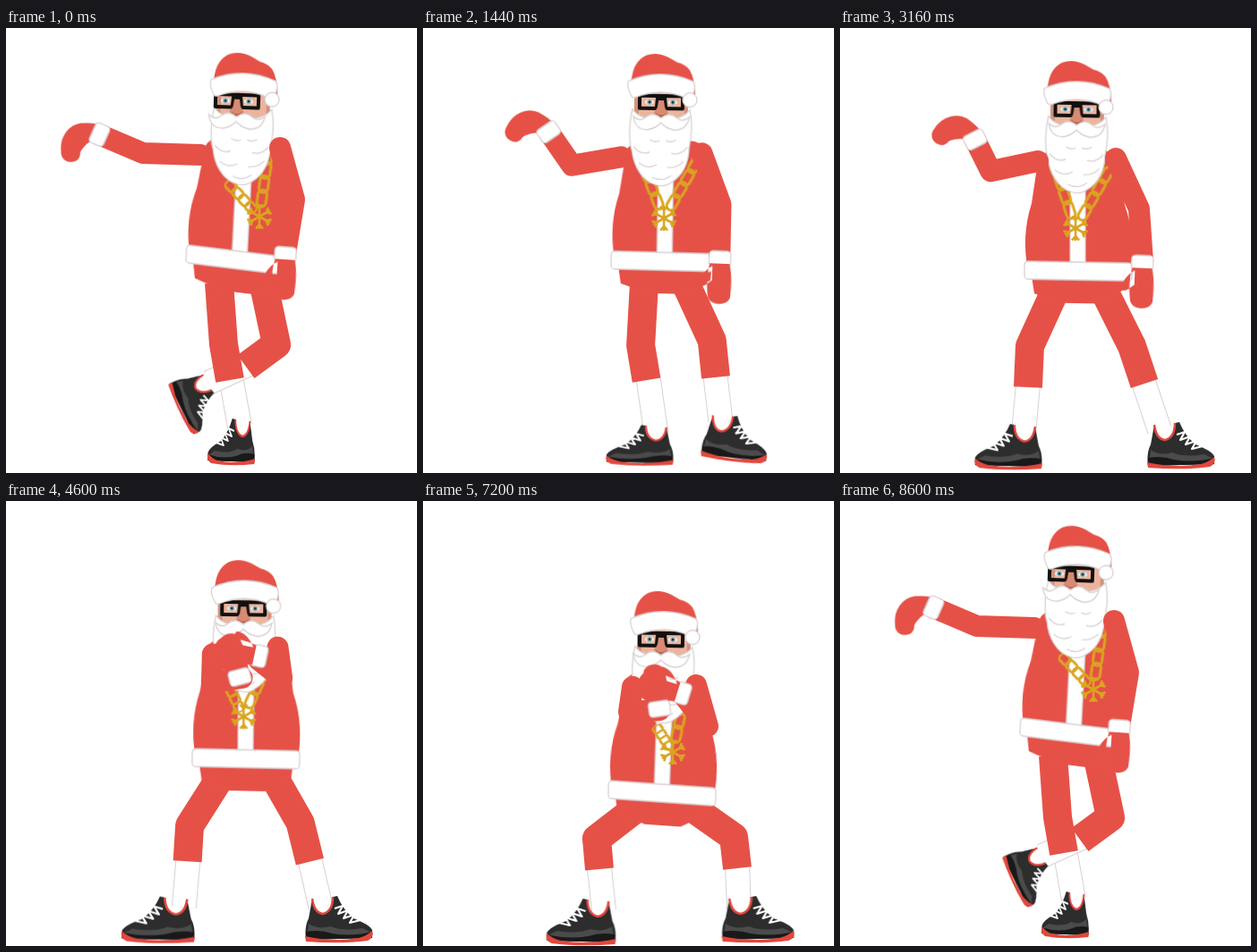
An HTML page without scripts that plays this animation: 459x498 px, repeating every 8640 ms.

```html
<!DOCTYPE html>
<html lang="en">
<head>
<meta charset="utf-8">
<title>Dancing Santa</title>
<style>
html,body{margin:0;width:100%;height:100%;overflow:hidden;background:#fff}
svg{display:block;width:459px;height:498px}
.red{fill:#e65147}
.white{fill:#fff;stroke:#d9d0d2;stroke-width:1.3}
.limb{fill:none;stroke:#e65147;stroke-linejoin:round}
.arm{stroke-width:24;stroke-linecap:round}
.pants{stroke-width:32}
.edge{fill:none;stroke:#d9d0d2;stroke-width:28}
.sock{fill:none;stroke:#fff;stroke-width:26}
.gold{fill:none;stroke:#d9a51f;stroke-width:3}
.fold{fill:none;stroke:#ddd3d5;stroke-width:1.4}

/* every moving part shares one clock */
.a{animation:8.64s ease-in-out infinite}
.head{animation-name:head}
.look{animation-name:look}
.torso{animation-name:torso}
.charm{animation-name:charm}
.chain-l{animation-name:chain-l}
.chain-r{animation-name:chain-r}
.arm-l{animation-name:arm-l}
.arm-r{animation-name:arm-r}
.hand-l{animation-name:hand-l}
.hand-r{animation-name:hand-r}
.mitt{animation-name:mitt}
.cuff{animation-name:cuff}
.pants-l{animation-name:pants-l}
.pants-r{animation-name:pants-r}
.sock-l{animation-name:sock-l}
.sock-r{animation-name:sock-r}
.shoe-l{animation-name:shoe-l}
.shoe-r{animation-name:shoe-r}

@keyframes head{
0%,99.5%,100%{transform:translate(265px,82px) rotate(2deg)}
5.1%{transform:translate(267px,78px) rotate(1deg)}
10.2%{transform:translate(268px,80px) rotate(0deg)}
15.3%{transform:translate(266px,82px) rotate(1deg)}
20.4%{transform:translate(266px,89px) rotate(0deg)}
26.4%{transform:translate(265px,96px) rotate(0deg)}
36%{transform:translate(265px,91px) rotate(1deg)}
47.7%{transform:translate(264px,109px) rotate(0deg)}
57%{transform:translate(268px,126px) rotate(1deg)}
66.2%{transform:translate(272px,139px) rotate(2deg)}
75%{transform:translate(270px,139px) rotate(0deg)}
83.3%{transform:translate(269px,155px) rotate(1deg)}
90%{transform:translate(269px,138px) rotate(1deg)}
}
@keyframes look{
0%,99.5%,100%{transform:translate(-7px,0)}
10.2%,26.4%{transform:translate(0,0)}
47.7%{transform:translate(-1px,0)}
66.2%,83.3%{transform:translate(-3px,0)}
}
@keyframes torso{
0%,99.5%,100%{transform:translate(261px,260px) rotate(3deg) skewY(4deg)}
10.2%{transform:translate(275px,256px) rotate(0deg) skewY(-1deg)}
15.3%{transform:translate(270px,260px) rotate(1deg) skewY(1deg)}
20.4%{transform:translate(271px,268px) rotate(0deg) skewY(-1deg)}
26.4%{transform:translate(265px,278px) rotate(0deg) skewY(0deg)}
36%{transform:translate(266px,272px) rotate(0deg) skewY(1deg)}
47.7%{transform:translate(266px,283px) rotate(1deg) skewY(1deg)}
66.2%{transform:translate(276px,312px) rotate(-1deg) skewY(-1deg)}
75%{transform:translate(271px,312px) rotate(0deg) skewY(0deg)}
83.3%{transform:translate(267px,327px) rotate(2deg) skewY(2deg)}
90%{transform:translate(267px,312px) rotate(1deg) skewY(2deg)}
}
@keyframes charm{
0%,99.5%,100%{transform:translate(283px,211px)}
10.2%{transform:translate(264px,207px)}
15.3%{transform:translate(270px,212px)}
20.4%{transform:translate(264px,218px)}
26.4%{transform:translate(259px,229px)}
36%{transform:translate(263px,224px)}
47.7%{transform:translate(264px,236px)}
66.2%{transform:translate(271px,264px)}
75%{transform:translate(272px,264px)}
83.3%{transform:translate(279px,281px)}
90%{transform:translate(276px,265px)}
}
@keyframes chain-l{
0%,99.5%,100%{transform:rotate(-43deg) scale(1,.68)}
10.2%{transform:rotate(-23deg) scale(1,1)}
26.4%,36%{transform:rotate(-18deg) scale(1,1.05)}
47.7%{transform:rotate(-24deg) scale(1,.6)}
66.2%{transform:rotate(-34deg) scale(1,.55)}
83.3%{transform:rotate(-33deg) scale(1,.45)}
}
@keyframes chain-r{
0%,99.5%,100%{transform:rotate(8deg)}
10.2%,26.4%,36%{transform:rotate(30deg)}
47.7%{transform:rotate(25deg)}
66.2%{transform:rotate(23deg)}
83.3%{transform:rotate(12deg)}
}
@keyframes arm-l{
0%,99.5%,100%{d:path("M217 142L153 140L106 120")}
10.2%{d:path("M222 140L167 148L140 110")}
20.4%{d:path("M221 146L166 156L140 118")}
26.4%{d:path("M222 153L167 163L146 126")}
36%{d:path("M221 149L168 160L150 124")}
47.7%{d:path("M231 168L229 206L264 198")}
66.2%{d:path("M230 186L234 190L262 197")}
83.3%{d:path("M234 208L230 236L264 234")}
90%{d:path("M234 194L228 222L262 218")}
95.4%{d:path("M220 165L178 180L155 150")}
}
@keyframes hand-l{
0%,99.5%,100%{transform:translate(104px,119px) rotate(-66deg)}
10.2%{transform:translate(140px,110px) rotate(-38deg)}
20.4%{transform:translate(140px,118px) rotate(-33deg)}
26.4%{transform:translate(146px,126px) rotate(-27deg)}
36%{transform:translate(150px,124px) rotate(-27deg)}
47.7%{transform:translate(264px,198px) rotate(-12deg)}
66.2%{transform:translate(247px,190px) rotate(-26deg)}
83.3%{transform:translate(264px,232px) rotate(-8deg)}
90%{transform:translate(262px,218px) rotate(-12deg)}
95.4%{transform:translate(155px,150px) rotate(-38deg)}
}
@keyframes mitt{
0%,36%,96%,100%{d:path("M-9 -4C-15 -9 -22 -11 -27 -11C-32 -9 -36 -9 -39 -13C-45 -20 -42 -28 -35 -31C-24 -38 -6 -38 3 -24C8 -14 11 -6 10 2ZM-6 -12C-6 -12 -6 -12 -6 -12C-6 -12 -6 -12 -6 -12Z")}
47.7%,90%{d:path("M-11 4C-13 -8 -13 -16 -13 -24C-13 -30 -13 -36 -12 -42C-10 -52 9 -52 11 -42C13 -30 13 -20 12 -10C12 -4 11 0 11 4ZM-8 -6C-18 -12 -24 -22 -24 -29C-20 -35 -14 -28 -8 -24Z")}
}
@keyframes cuff{
0%,57%,75%,100%{transform:scale(1)}
66.2%{transform:scale(0)}
}
@keyframes arm-r{
0%,99.5%,100%{d:path("M306 134L322 192L312 252")}
10.2%{d:path("M313 136L331 193L327 250")}
20.4%{d:path("M311 142L333 199L333 256")}
26.4%{d:path("M309 150L334 207L338 264")}
36%{d:path("M308 146L334 202L338 258")}
47.7%{d:path("M304 160L310 202L284 176")}
66.2%{d:path("M301 180L300 183L277 187")}
83.3%{d:path("M305 206L318 252L289 215")}
90%{d:path("M305 192L320 236L292 202")}
95.4%{d:path("M306 160L362 163L410 150")}
}
@keyframes hand-r{
0%,99.5%,100%{transform:translate(312px,254px) rotate(184deg)}
10.2%{transform:translate(328px,255px) rotate(183deg)}
20.4%{transform:translate(333px,260px) rotate(182deg)}
26.4%{transform:translate(338px,270px) rotate(180deg)}
36%{transform:translate(338px,264px) rotate(182deg)}
47.7%{transform:translate(284px,173px) rotate(262deg)}
66.2%{transform:translate(275px,175px) rotate(369deg)}
83.3%{transform:translate(289px,215px) rotate(287deg)}
90%{transform:translate(292px,202px) rotate(270deg)}
95.4%{transform:translate(410px,150px) rotate(100deg)}
}
@keyframes pants-l{
0%,99.5%,100%{d:path("M238 285L243 354L250 394")}
10.2%{d:path("M249 283L246 353L251 392")}
20.4%{d:path("M246 290L242 356L249 395")}
26.4%{d:path("M241 293L219 362L220 403")}
36%{d:path("M242 290L212 356L210 402")}
47.7%{d:path("M243 297L206 362L203 402")}
66.2%{d:path("M245 329L201 369L201 409")}
75%{d:path("M241 329L198 372L199 410")}
83.3%{d:path("M238 344L194 378L197 412")}
90%{d:path("M238 330L200 372L200 410")}
}
@keyframes sock-l{
0%,99.5%,100%{d:path("M251 390L261 446")}
10.2%{d:path("M255 388L262 456")}
20.4%{d:path("M250 392L260 454")}
26.4%{d:path("M220 401L221 456")}
36%{d:path("M210 400L205 454")}
47.7%{d:path("M204 400L198 454")}
66.2%{d:path("M201 407L202 458")}
83.3%,90%{d:path("M197 411L202 458")}
}
@keyframes shoe-l{
0%,99.5%,100%{transform:translate(264px,442px) scale(.7,1)}
10.2%{transform:translate(262px,450px) scale(1,.8)}
20.4%{transform:translate(259px,448px) scale(1,.9)}
26.4%{transform:translate(221px,448px) scale(.87,.97)}
36%{transform:translate(206px,448px) scale(1,.98)}
47.7%{transform:translate(188px,447px) scale(1.1,1)}
66.2%,83.3%,90%{transform:translate(195px,450px) scale(1.03,1)}
}
@keyframes pants-r{
0%,99.5%,100%{d:path("M288 288L302 354L268 379")}
5.1%{d:path("M291 286L322 348L334 392")}
10.2%{d:path("M298 283L307 342L280 367")}
15.3%{d:path("M294 288L325 350L335 394")}
20.4%{d:path("M297 290L310 348L282 373")}
26.4%{d:path("M292 293L320 362L325 403")}
36%{d:path("M293 290L326 356L340 398")}
47.7%{d:path("M293 297L323 358L336 403")}
66.2%{d:path("M309 328L353 369L354 406")}
75%{d:path("M304 330L351 370L353 408")}
83.3%{d:path("M303 345L347 376L351 411")}
90%{d:path("M302 330L346 370L350 408")}
}
@keyframes sock-r{
0%,99.5%,100%{d:path("M272 376L226 397")}
5.1%{d:path("M333 390L348 442")}
10.2%{d:path("M282 365L254 398")}
15.3%{d:path("M334 392L346 446")}
20.4%{d:path("M284 371L256 404")}
26.4%{d:path("M325 401L329 457")}
36%{d:path("M339 396L357 450")}
47.7%{d:path("M336 401L351 454")}
66.2%{d:path("M354 404L354 456")}
83.3%,90%{d:path("M351 409L353 456")}
}
@keyframes shoe-r{
0%,99.5%,100%{transform:translate(223px,398px) rotate(66deg) scale(.84,.84)}
5.1%{transform:translate(352px,438px) rotate(4deg) scale(1,1)}
10.2%{transform:translate(255px,397px) rotate(42deg) scale(.84,.84)}
15.3%{transform:translate(349px,443px) rotate(2deg) scale(1,1)}
20.4%{transform:translate(257px,403px) rotate(40deg) scale(.84,.84)}
26.4%{transform:translate(328px,448px) rotate(0deg) scale(.86,1)}
36%{transform:translate(363px,446px) rotate(0deg) scale(1,1)}
47.7%,66.2%{transform:translate(354px,447px) rotate(0deg) scale(1,1)}
83.3%,90%{transform:translate(355px,447px) rotate(0deg) scale(1.07,1)}
}
</style>
</head>
<body>
<svg viewBox="0 0 459 498" role="img" aria-label="Santa dancing">
<defs>
  <g id="shoe">
    <path d="M-12 -2Q-10 14 0 15Q11 12 11 -4L16 -5Q22 10 34 20Q52 27 55 33L55 42L-19 44Q-21 30 -16 20Z" fill="#2d2d2d"/>
    <path d="M-16 26Q-6 33 8 29Q22 35 44 31L54 36L40 41L-18 41Z" fill="#4b4b4b"/>
    <path d="M-19 35Q-4 32 10 37Q32 41 55 35V42L-19 44Z" fill="#191919"/>
    <path d="M-20 40Q10 47 40 42Q50 39 55 34Q58 41 50 45Q20 49 -19 46Z" fill="#e2473d"/>
    <path d="M-12 -2Q-10 14 0 15Q11 12 11 -4" fill="none" stroke="#e2473d" stroke-width="2.5"/>
    <path d="M13 9L22 6L17 15L28 11L23 20L35 16L30 25L42 22" fill="none" stroke="#fff" stroke-width="2.2" stroke-linejoin="round"/>
  </g>
  <rect id="link" class="gold" x="-5" y="-30" width="10" height="19" rx="5"/>
  <g id="strand">
    <use href="#link"/><use href="#link" y="-16"/><use href="#link" y="-32"/><use href="#link" y="-48"/>
  </g>
  <path id="ray" class="gold" style="stroke-width:2.6" d="M0 0V-14M-4 -13.5L0 -9L4 -13.5"/>
  <rect id="band" class="white" x="-12" y="-8" width="24" height="17" rx="4"/>
</defs>

<g>
  <path class="edge a sock-l"/><path class="sock a sock-l"/>
  <g class="a shoe-l"><use href="#shoe" transform="scale(-1 1)"/></g>
  <path class="edge a sock-r"/><path class="sock a sock-r"/>
  <g class="a shoe-r"><use href="#shoe"/></g>
  <path class="limb pants a pants-r"/>
  <path class="limb pants a pants-l"/>
</g>

<g class="a torso">
  <path class="red" d="M-53 0H53L51 20L22 36H-18L-49 26Z"/>
  <path class="red" d="M-56 0C-61 -25 -60 -50 -52 -75L-45 -122Q-41 -134 -20 -136H24Q42 -135 46 -122L52 -75C61 -50 62 -25 58 0Z"/>
  <path class="white" d="M-9 0V-110H8V0Z"/>
  <rect class="white" x="-60" y="-10" width="120" height="20" rx="4"/>
</g>

<g class="a charm">
  <g class="a chain-l"><use href="#strand"/></g>
  <g class="a chain-r"><use href="#strand"/></g>
  <use href="#ray"/><use href="#ray" transform="rotate(60)"/><use href="#ray" transform="rotate(120)"/>
  <use href="#ray" transform="rotate(180)"/><use href="#ray" transform="rotate(240)"/><use href="#ray" transform="rotate(300)"/>
</g>

<g class="a head">
  <path d="M-30 -14H30V20H-30Z" fill="#ecb49d"/>
  <path d="M-30 -10H-25V14H-30ZM26 -10H30V14H26Z" fill="#d2927c"/>
  <path class="white" d="M-32 8C-36 25 -35 48 -32 54C-30 72 -20 88 -6 92Q4 96 12 90C26 82 32 66 32 50C35 36 35 20 32 8Q24 20 0 20Q-24 20 -32 8Z"/>
  <path class="fold" d="M-30 50Q-22 60 -12 56M12 57Q22 60 30 50M-24 68Q-14 76 -4 70M8 73Q18 74 26 66M-12 42Q-6 46 -1 43M6 43Q12 46 17 42M-9 84Q2 90 12 82"/>
  <g class="a look">
    <ellipse cx="-13" cy="0" rx="5" ry="3" fill="#f4f4f4"/><ellipse cx="13" cy="0" rx="5" ry="3" fill="#f4f4f4"/>
    <circle cx="-13" r="2.8" fill="#6ba3b5"/><circle cx="13" r="2.8" fill="#6ba3b5"/>
    <circle cx="-13" r="1.2" fill="#222"/><circle cx="13" r="1.2" fill="#222"/>
    <path d="M-3 -4L-8 13Q0 20 8 13L3 -4Z" fill="#d98a72"/>
    <path d="M-6 13Q0 18 6 13" fill="none" stroke="#b0503e" stroke-width="1.6"/>
    <path d="M-26 -9H26V7Q26 9 23 9H7Q5 9 4 5L3 -2H-3L-4 5Q-5 9 -7 9H-23Q-26 9 -26 7ZM-22 -5V5H-7L-6 -5ZM22 -5H6L7 5H22Z" fill="#111" fill-rule="evenodd"/>
    <path class="white" d="M0 18Q-9 10 -17 17Q-24 23 -31 16Q-29 31 -15 31Q-5 29 0 23Q5 29 15 31Q29 31 32 16Q24 23 17 17Q9 10 0 18Z"/>
  </g>
  <path class="red" d="M-34 -20Q-33 -36 -28 -43Q-24 -49 -18 -52Q-6 -57 8 -50L17 -45Q26 -43 31 -37Q37 -28 38 -8L28 -14Z"/>
  <path class="white" d="M-37 -23Q-2 -39 35 -24Q38 -21 37 -15L34 -3Q31 -1 28 -5Q0 -17 -29 -5Q-33 -4 -34 -8Q-39 -17 -37 -23Z"/>
  <circle class="white" cx="32" cy="-3" r="8"/>
</g>

<path class="limb arm a arm-r"/>
<path class="limb arm a arm-l"/>
<g class="a hand-r">
  <use class="a cuff" href="#band"/>
  <path class="red" d="M-11 -5C-14 -16 -14 -30 -13 -42C-11 -53 10 -53 12 -42C14 -30 14 -16 11 -5ZM8 -8C18 -14 22 -22 22 -29C18 -34 14 -28 8 -24Z"/>
</g>
<g class="a hand-l">
  <path class="red a mitt"/>
  <use class="a cuff" href="#band"/>
</g>
</svg>
</body>
</html>
```
